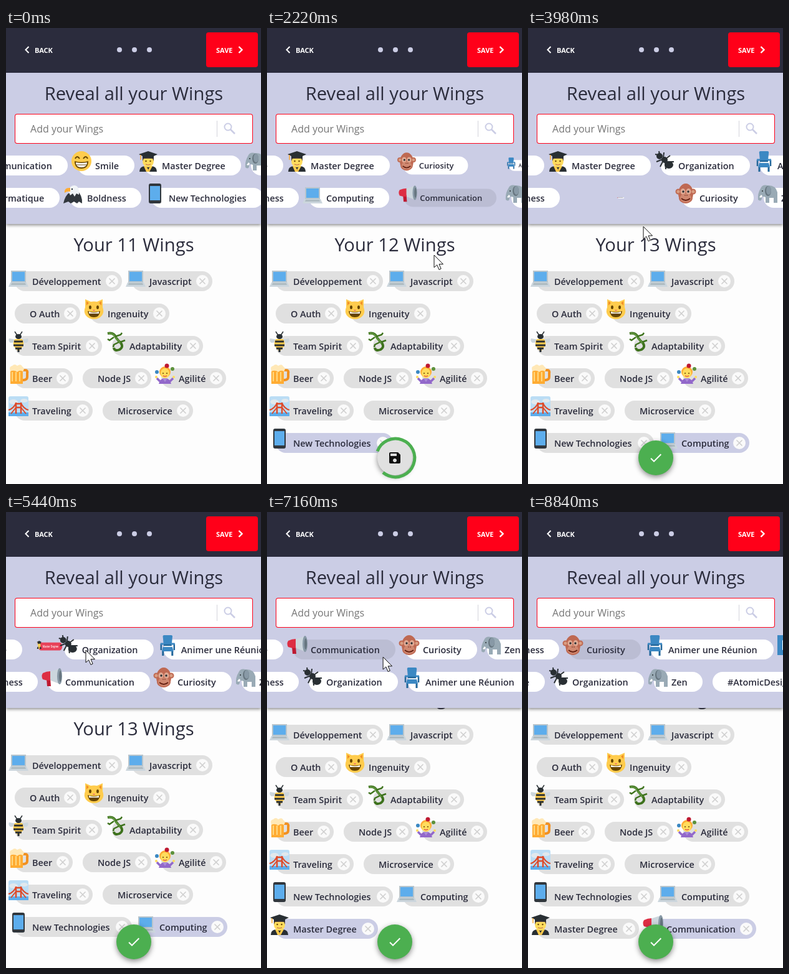
An HTML page with a canvas that plays this animation: 409 by 733 pixels, repeating every 9330 ms.

```html
<!DOCTYPE html>
<html lang="en">
<head>
<meta charset="utf-8">
<title>Wings</title>
<style>
  html, body { margin: 0; width: 100%; height: 100%; overflow: hidden; background: #fdfdfd; }
  canvas { display: block; width: 409px; height: 733px; }
</style>
</head>
<body>
<canvas id="stage"></canvas>
<script>
const W = 409, H = 733, LOOP = 9330;
const canvas = document.getElementById('stage');
const ctx = canvas.getContext('2d');
const ratio = window.devicePixelRatio || 1;
canvas.width = W * ratio;
canvas.height = H * ratio;

const INK = '#2b2c3c', LAVENDER = '#cbcde5', GREY = '#e0e0e0', RED = '#ff0019', GREEN = '#4caf50';
const FONT = '"Open Sans", "Noto Sans", sans-serif';
const LABEL_FONT = '600 14.4px ' + FONT;
const TITLE_FONT = '29.2px ' + FONT;
const LEAVE = 360, ENTER = 350;

const clamp = v => Math.max(0, Math.min(1, v));
const easeOut = p => 1 - (1 - clamp(p)) ** 2;
const smooth = p => { p = clamp(p); return p * p * (3 - 2 * p); };

// Icons live in a 32 x 32 box: [colour, path, stroke width if it is a line]
const dot = (x, y, r, ry = r) => `M${x - r} ${y}a${r} ${ry} 0 1 0 ${2 * r} 0a${r} ${ry} 0 1 0 ${-2 * r} 0z`;
const icons = {
  laptop: [
    ['#b8c5cd', 'M4 6H28V25H4z'], ['#5dadec', 'M6 8H26V23H6z'],
    ['#ccd6dd', 'M3 25H29L32 32H0z'], ['#aebbc1', 'M5 26H27L28 29H4z']],
  smile: [
    ['#ffcc4d', dot(16, 16, 16)], ['#664500', 'M5 16Q16 19 27 16Q27 28 16 28Q5 28 5 16z'],
    ['#fff', 'M7 18Q16 20 25 18Q25 26 16 26Q7 26 7 18z'], ['#664500', 'M7 22H25', 1],
    ['#664500', 'M6 12Q9 6 13 12M19 12Q23 6 26 12', 2]],
  graduate: [
    ['#292f33', 'M2 33Q2 25 10 24H22Q30 25 30 33z'], ['#ffcc4d', 'M9 24H13L18 33H13zM23 24H19L16 30L18 33z'],
    ['#ffdc5d', dot(16, 16, 9, 10)], ['#594539', 'M7 16V9H25V16L23 12H9z'],
    ['#292f33', 'M1 5L16 0L31 5L25 8V12Q16 9 7 12V8z'], ['#ffac33', 'M4 6V14', 1.5],
    ['#664500', dot(12.5, 16, 1.2) + dot(19.5, 16, 1.2)], ['#c1694f', 'M12 21Q16 23 20 21', 1.2]],
  elephant: [
    ['#99aab5', 'M5 8Q8 1 16 3Q29 2 32 14V31H26V23H19V31H13V22Q7 19 7 24Q6 30 1 26Q0 16 5 8z'],
    ['#66757f', dot(17, 12, 5, 8)], ['#8899a6', dot(18, 11, 4, 7)],
    ['#292f33', dot(8, 12, 1)], ['#fff', 'M8 20Q7 24 3 22L6 18z']],
  eagle: [
    ['#31373d', 'M0 32Q3 18 11 14L21 10Q31 19 30 32L25 29L22 32L17 29L12 32L8 29z'],
    ['#f0f4f7', 'M8 12Q10 3 18 3Q26 4 25 18L21 16L18 21L15 16L11 19z'],
    ['#ffac33', 'M11 7Q1 6 2 15Q6 12 11 13z'], ['#292f33', dot(14, 9, 1.2)]],
  phone: [
    ['#31373d', 'M9 0H23Q26 0 26 3V29Q26 32 23 32H9Q6 32 6 29V3Q6 0 9 0z'], ['#5dadec', 'M8 4H24V27H8z']],
  cat: [
    ['#ffcc4d', 'M2 0L11 4Q16 3 21 4L30 0V13Q33 20 29 26Q24 32 16 32Q8 32 3 26Q-1 20 2 13z'],
    ['#f18f26', 'M4 3L8 6L4 10zM28 3L24 6L28 10z'], ['#664500', dot(10, 13, 2, 3) + dot(22, 13, 2, 3)],
    ['#664500', 'M6 19Q16 22 26 19Q25 29 16 29Q7 29 6 19z'], ['#fff', 'M8 20Q16 23 24 20V23H8z'],
    ['#e75a70', 'M14 17H18L16 19z']],
  bee: [
    ['#ccd6dd', 'M13 13L1 11Q-1 15 3 18L13 17zM19 13L31 11Q33 15 29 18L19 17z'],
    ['#292f33', dot(16, 8, 5, 4)], ['#ffcc4d', 'M10 12H22Q27 20 21 27L16 32L11 27Q5 20 10 12z'],
    ['#292f33', 'M9 16H23M8 22H24M11 27H21M16 28V33', 3], ['#292f33', 'M14 6L10 0M18 6L22 0', 1.5]],
  lizard: [
    ['#3e721d', 'M3 3Q13 1 16 9Q20 15 24 18Q29 25 22 29Q14 32 13 26', 4],
    ['#5c913b', 'M4 3Q13 2 16 10L24 19', 3],
    ['#3e721d', 'M13 9L6 14L3 12M15 8L24 5L26 2M21 17L13 21L12 25M23 17L31 14', 2.5]],
  beer: [
    ['#f19020', 'M20 10H27Q31 10 30 15V21Q30 26 23 26H20', 4], ['#ffac33', 'M3 7H23V32H3z'],
    ['#ffd983', 'M6 13V28M12 13V28M18 13V28', 2],
    ['#ffe8b6', 'M3 12Q0 4 6 3Q10 -1 14 3Q20 -1 22 4Q27 7 23 12Q18 9 14 13Q9 9 3 12z']],
  juggler: [
    ['#ffac33', dot(16, 13, 9)], ['#ffdc5d', dot(16, 15, 7, 8)],
    ['#9268ca', 'M6 32Q8 23 16 23Q24 23 26 32z'], ['#aa8dd8', 'M12 23H20L16 29z'],
    ['#9268ca', 'M8 28L3 23M24 28L29 23', 3.5], ['#ffdc5d', dot(2, 21, 2) + dot(30, 21, 2)],
    ['#3b88c3', dot(3, 13, 3)], ['#be1931', dot(19, 3, 3.5)], ['#5c913b', dot(28, 8, 3)],
    ['#664500', dot(13, 15, 1) + dot(19, 15, 1)], ['#dd2e44', 'M13 19Q16 21 19 19', 1.2]],
  bridge: [
    ['#bbddf5', 'M3 0H29Q32 0 32 3V31H0V3Q0 0 3 0z'], ['#e1e8ed', dot(8, 9, 7, 4) + dot(25, 7, 6, 3)],
    ['#5dadec', 'M0 26H32V32H0z'], ['#dd4b2b', 'M12 10V28M20 10V28M12 12H20M12 18H20', 2.5],
    ['#dd4b2b', 'M0 22Q8 20 12 11M20 11Q24 20 32 22', 2], ['#dd4b2b', 'M4 28L12 18M28 28L20 18', 2]],
  monkey: [
    ['#bf6952', dot(4, 13, 4.5) + dot(28, 13, 4.5) + dot(16, 16, 12, 16) + dot(16, 23, 11, 9)],
    ['#d99e82', dot(4, 13, 2.5) + dot(28, 13, 2.5)],
    ['#e0aa94', dot(11.5, 13, 4, 5) + dot(20.5, 13, 4, 5)], ['#d08870', dot(16, 23, 9, 7)],
    ['#292f33', dot(12, 13, 1.7) + dot(20, 13, 1.7)], ['#662113', 'M9 24Q16 30 23 24', 2],
    ['#662113', dot(15, 19, 0.8) + dot(18, 19, 0.8)]],
  chair: [
    ['#269', 'M9 25V33M24 25V33', 3],
    ['#3b88c3', 'M11 0H22Q25 0 24 4L23 15H10L9 4Q8 0 11 0zM9 19H24L26 26H7z'],
    ['#269', 'M6 14V24M27 14V24M10 16H23', 2.5], ['#3b88c3', 'M5 14H10M23 14H28', 3]],
  ant: [
    ['#292f33', 'M13 13L3 17M14 15L9 25M17 17L18 29M14 11L15 2M18 12L25 7M20 17L31 17M6 6L1 5M8 5L7 0', 2],
    ['#292f33', dot(8, 8, 5) + dot(16, 14, 5) + dot(23, 22, 7, 6)]],
  megaphone: [
    ['#ccd6dd', 'M9 8L28 2V26L10 19z'], ['#be1931', 'M8 18H14L15 30H9z'],
    ['#dd2e44', 'M2 9Q8 6 14 6V21Q7 21 2 19Q-1 14 2 9z'], ['#8899a6', dot(29, 14, 4, 13)],
    ['#66757f', dot(30, 14, 2, 9)]],
  screen: [['#3b88c3', 'M0 0H32V32H0z'], ['#fff', 'M8 8L24 16L8 24z']]
};
for (const name in icons)
  icons[name] = icons[name].map(([color, d, line]) => ({ color, path: new Path2D(d), line }));

const iconOf = {
  'Développement': 'laptop', Javascript: 'laptop', Computing: 'laptop', Ingenuity: 'cat',
  'Team Spirit': 'bee', Adaptability: 'lizard', Beer: 'beer', 'Agilité': 'juggler', Traveling: 'bridge',
  'New Technologies': 'phone', 'Master Degree': 'graduate', Communication: 'megaphone', Smile: 'smile',
  Zen: 'elephant', Boldness: 'eagle', Curiosity: 'monkey', Organization: 'ant',
  'Animer une Réunion': 'chair', Video: 'screen'
};

// Suggested chips
const widthOf = {
  Communication: 164, Smile: 91, 'Master Degree': 155, Zen: 78, '#Informatique': 150, Boldness: 115,
  'New Technologies': 180, Computing: 129, Curiosity: 115, 'Animer une Réunion': 197,
  Organization: 143, Video: 90, '#AtomicDesign': 150
};
const START = -1e4, END = 1e5;
const item = (label, from = START, to = END, delay = 0, hover = END) => ({ label, from, to, delay, hover });
const rows = [
  [
    item('Boldness', 7560), item('Communication', START, 1600), item('Smile', START, 7450),
    item('Master Degree', START, 5190), item('Communication', 5700, 7200, 0, 6850),
    item('Organization', 3630, 5450), item('Curiosity', 1960, 3300, 20),
    item('Curiosity', 5700, END, 0, 7700), item('Animer une Réunion', 1960, 5450, 145),
    item('Zen', START, 1600), item('Zen', 5700, 7450), item('Animer une Réunion', 7700), item('Video', 7800)
  ],
  [
    item('Smile', 7560), item('#Informatique', START, 1600), item('Boldness', START, 7450),
    item('New Technologies', START, 1120), item('Computing', 1700, 3300),
    item('Communication', 1960, 3300, 20, 1960), item('Communication', 3630, 5450, 340),
    item('Organization', 5700), item('Curiosity', 3630, 5450), item('Animer une Réunion', 5700, 7450),
    item('Zen', 1700, 5450), item('Zen', 7700), item('#AtomicDesign', 7750)
  ]
];

// Chosen chips: label, width, row, time added
const chosen = [
  ['Développement', 172, 0], ['Javascript', 129, 0], ['O Auth', 105, 1], ['Ingenuity', 127, 1],
  ['Team Spirit', 140, 2], ['Adaptability', 146, 2], ['Beer', 93, 3], ['Node JS', 110, 3], ['Agilité', 104, 3],
  ['Traveling', 125, 4], ['Microservice', 145, 4], ['New Technologies', 188, 5, 1480],
  ['Computing', 137, 5, 3660], ['Master Degree', 164, 6, 5550], ['Communication', 172, 6, 7560]
];

// Pointer tip: time, x, y
const pointer = [
  [200, 322, 733], [400, 324, 520], [640, 275, 230], [740, 262, 201], [830, 254, 245], [910, 259, 277],
  [1750, 259, 277], [2220, 268, 365], [2500, 268, 365], [2960, 150, 275], [3700, 150, 275],
  [3980, 185, 319], [4220, 193, 371], [4250, 193, 371], [4660, 127, 211], [4810, 127, 211],
  [4940, 128, 222], [5500, 128, 222], [6050, 190, 304], [6130, 190, 304], [6900, 188, 234],
  [8010, 180, 230], [8780, 215, 733]
];

const savingPeriods = [[1600, 2700], [7700, 8500]];

function roundRect(x, y, w, h, r, fill) {
  ctx.beginPath();
  ctx.roundRect(x, y, w, h, r);
  ctx.fillStyle = fill;
  ctx.fill();
}

function circle(x, y, r, fill) {
  ctx.beginPath();
  ctx.arc(x, y, r, 0, 7);
  ctx.fillStyle = fill;
  ctx.fill();
}

function line(color, width, ...points) {
  ctx.beginPath();
  points.forEach(([x, y]) => ctx.lineTo(x, y));
  ctx.strokeStyle = color;
  ctx.lineWidth = width;
  ctx.stroke();
}

function text(string, x, y, font, color = INK, align = 'left') {
  ctx.font = font;
  ctx.fillStyle = color;
  ctx.textAlign = align;
  ctx.fillText(string, x, y);
}

function withShadow(blur, offset, draw) {
  ctx.save();
  ctx.shadowColor = 'rgba(0,0,0,.45)';
  ctx.shadowBlur = blur * ratio;
  ctx.shadowOffsetY = offset * ratio;
  draw();
  ctx.restore();
}

function drawIcon(name, x, y) {
  ctx.save();
  ctx.translate(x, y);
  for (const { color, path, line } of icons[name]) {
    if (line) {
      ctx.strokeStyle = color;
      ctx.lineWidth = line;
      ctx.stroke(path);
    } else {
      ctx.fillStyle = color;
      ctx.fill(path);
    }
  }
  ctx.restore();
}

// Draws a chip centred on the current origin
function chip(label, w, fill, closable, color = INK) {
  const x = -w / 2, icon = iconOf[label];
  roundRect(x, -16, w, 32, 16, fill);
  if (icon) drawIcon(icon, x - 10, -23);
  text(label, x + (icon ? 28 : 24), 5.5, LABEL_FONT, color);
  if (closable) {
    const cx = -x - 16;
    circle(cx, 0, 10, '#fafafa');
    line('#cfcfcf', 1.6, [cx - 4.5, -4.5], [cx + 4.5, 4.5]);
    line('#cfcfcf', 1.6, [cx + 4.5, -4.5], [cx - 4.5, 4.5]);
  }
}

function placed(x, y, sx, sy, draw) {
  if (sx <= 0 || sy <= 0) return;
  ctx.save();
  ctx.translate(x, y);
  ctx.scale(sx, sy);
  draw();
  ctx.restore();
}

function drawChosen(t) {
  const scroll = 49 * smooth((t - 5550) / 350);
  const present = chosen.filter(([, , , added = START]) => t >= added);
  text(`Your ${present.length} Wings`, 205, 359 - scroll, TITLE_FONT, INK, 'center');
  let x = 14, lastRow = 0;
  present.forEach(([label, w, row, added = START], i) => {
    if (row !== lastRow) x = 14;
    lastRow = row;
    const newest = i === present.length - 1 && added > 0;
    const s = easeOut((t - added) / 300);
    placed(x + w / 2, 407 + 52 * row - scroll, s, s, () => chip(label, w, newest ? LAVENDER : GREY, true));
    x += w + 16;
  });
}

function drawSuggestions(t) {
  rows.forEach((row, r) => {
    let x = r - 65;
    const y = 221 + 52 * r;
    for (const { label, from, to, delay, hover } of row) {
      if (t < from || t >= to + LEAVE) continue;
      const w = widthOf[label], left = clamp(1 - (t - to) / LEAVE);
      if (left < 1) {
        const sx = left * 0.82;
        placed(x + 14 * (1 - left) + w * sx / 2, y - 7 * (1 - left), sx, Math.min(1, left * 1.3),
          () => chip(label, w, left < 0.8 ? '#e8425a' : '#fff', false, left < 0.8 ? '#fff' : INK));
      } else {
        const s = easeOut((t - from - delay) / ENTER);
        placed(x + w / 2, y, s, s, () => chip(label, w, t >= hover ? '#bbbdd3' : '#fff'));
      }
      x += (w + 16) * left;
    }
  });
}

function drawPanel(t) {
  withShadow(5, 2, () => roundRect(0, 0, W, 315, 0, LAVENDER));
  text('Reveal all your Wings', 205, 116, TITLE_FONT, INK, 'center');
  roundRect(14, 138, 382, 48, 4, RED);
  roundRect(15, 139, 380, 46, 3, '#fff');
  text('Add your Wings', 39, 168, '16px ' + FONT, '#757575');
  line('#d3d4dc', 1, [338.5, 149], [338.5, 175]);
  ctx.beginPath();
  ctx.arc(356, 159, 5.5, 0, 7);
  ctx.strokeStyle = LAVENDER;
  ctx.lineWidth = 2;
  ctx.stroke();
  line(LAVENDER, 2.6, [360, 163], [367, 170]);
  drawSuggestions(t);
}

function drawHeader() {
  roundRect(0, 0, W, 72, 0, '#2b2c3d');
  roundRect(321, 7, 83, 56, 4, RED);
  line('#fff', 2, [36.5, 30], [31.5, 35], [36.5, 40]);
  line('#fff', 2.4, [373.5, 30], [378.5, 35], [373.5, 40]);
  text('BACK', 46, 40, 'bold 11px ' + FONT, '#fff');
  text('SAVE', 337, 40, 'bold 11px ' + FONT, '#fff');
  [182, 206, 230].forEach(x => circle(x, 35, 4, LAVENDER));
}

const diskIcon = new Path2D('M17 3H5c-1.11 0-2 .9-2 2v14c0 1.1.89 2 2 2h14c1.1 0 2-.9 2-2V7l-4-4zm-5 16c-1.66 0-3-1.34-3-3s1.34-3 3-3 3 1.34 3 3-1.34 3-3 3zm3-10H5V5h10v4z');
const checkIcon = new Path2D('M9 16.17L4.83 12l-1.42 1.41L9 19 21 7l-1.41-1.41z');

function drawSaveButton(t) {
  const shown = easeOut((t - savingPeriods[0][0]) / 200);
  const saving = savingPeriods.find(([from, to]) => t >= from && t < to);
  placed(205, 691, shown, shown, () => {
    withShadow(8, 3, () => circle(0, 0, 28, saving ? '#e0e0e0' : GREEN));
    if (saving) {
      const turn = ((t - saving[0] + 80) / 1400) % 1;
      const head = 290 * smooth(turn * 2), tail = 280 * smooth(turn * 2 - 1);
      const angle = a => (20 + 360 * turn + a) * Math.PI / 180;
      ctx.beginPath();
      ctx.arc(1, 0, 30.8, angle(tail), angle(head));
      ctx.strokeStyle = GREEN;
      ctx.lineWidth = 5;
      ctx.stroke();
    }
    ctx.translate(-12, -12);
    ctx.fillStyle = saving ? '#111' : '#fff';
    ctx.fill(saving ? diskIcon : checkIcon);
  });
}

const arrow = new Path2D('M0 0V20L4.7 15.8L8 23.5L11.2 22L8 14.7H14.5z');

function drawPointer(t) {
  const i = pointer.findIndex(([time]) => time > t);
  if (i < 1) return;
  const [t0, x0, y0] = pointer[i - 1], [t1, x1, y1] = pointer[i];
  const p = (t - t0) / (t1 - t0);
  ctx.save();
  ctx.translate(x0 + (x1 - x0) * p, y0 + (y1 - y0) * p);
  ctx.fillStyle = '#fff';
  ctx.strokeStyle = '#111';
  ctx.lineWidth = 1;
  ctx.fill(arrow);
  ctx.stroke(arrow);
  ctx.restore();
}

function render(t) {
  ctx.setTransform(ratio, 0, 0, ratio, 0, 0);
  roundRect(0, 0, W, H, 0, '#fdfdfd');
  drawChosen(t);
  drawPanel(t);
  drawHeader();
  drawSaveButton(t);
  drawPointer(t);
}

const begin = performance.now();
function tick() {
  render((performance.now() - begin) % LOOP);
  requestAnimationFrame(tick);
}
tick();
</script>
</body>
</html>
```
